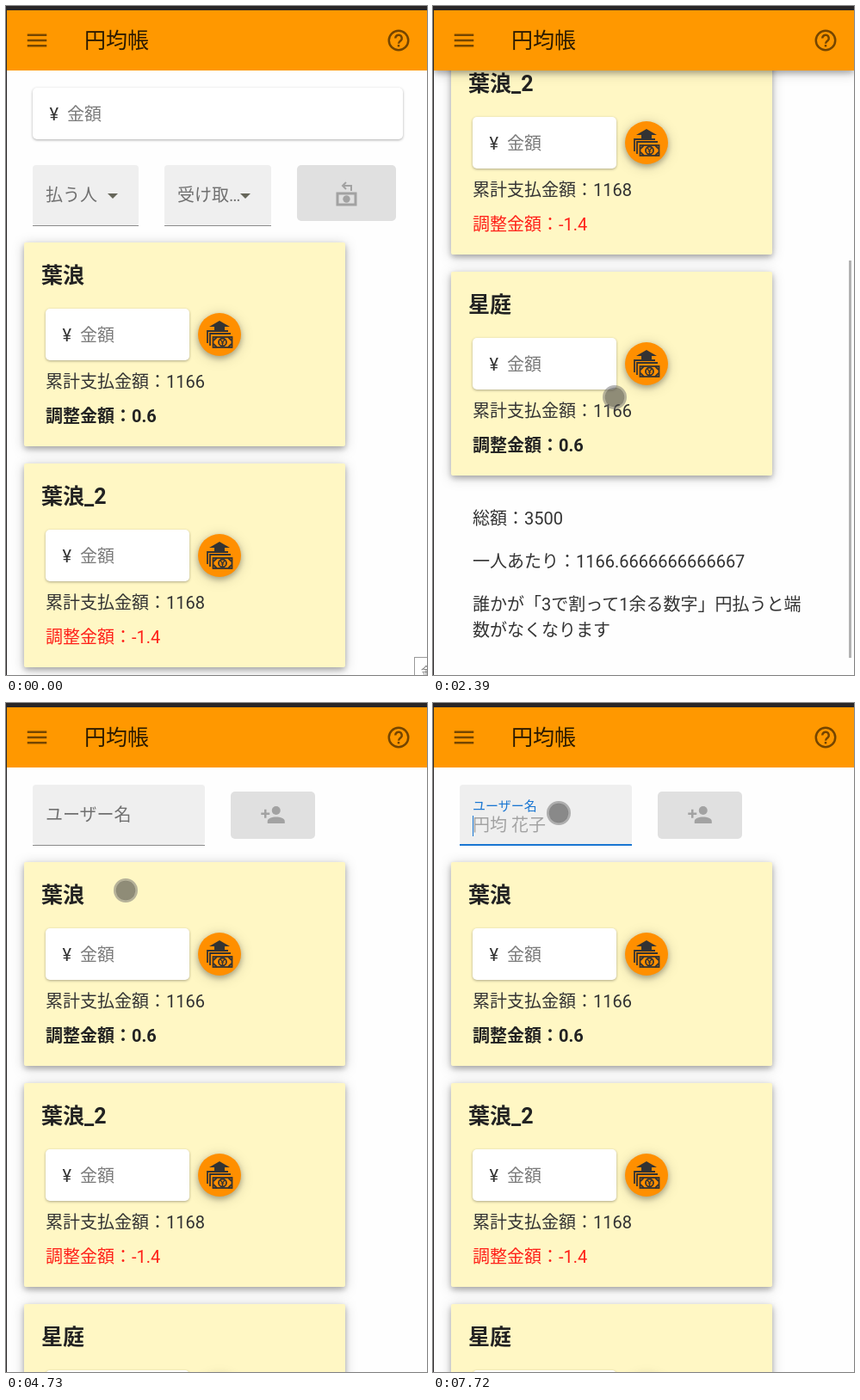
These frames come from a looping animation (489x778 px, 8 s). An HTML page:

```html
<!DOCTYPE html>
<html lang="ja">
<head>
<meta charset="utf-8">
<style>
html, body { margin: 0; width: 100%; height: 100%; overflow: hidden; background: #fefefe; }
svg { display: block; width: 489px; height: 778px; }
text { font: 20px Roboto, "Noto Sans CJK JP", "Noto Sans CJK", sans-serif; fill: #333; white-space: pre; }
.name { font-size: 25px; font-weight: 700; fill: #222; }
.bold { font-weight: 700; fill: #222; }
.title { font-size: 25px; fill: #2b1a00; }
.red { fill: #ff2018; }
.hint { fill: #7a7a7a; }
.label { fill: #707070; }
.item { font-size: 16.25px; fill: #222; }
.low { filter: drop-shadow(0 1.5px 1.5px rgba(0,0,0,.32)); }
.mid { filter: drop-shadow(0 3px 3px rgba(0,0,0,.24)) drop-shadow(0 2px 7px rgba(0,0,0,.2)); }
.line { fill: none; stroke: #000; stroke-width: 2; }
.off { fill: #a2a2a2; }
</style>
</head>
<body>
<svg id="stage" viewBox="0 0 489 778"></svg>
<script>
const rect = (x, y, w, h, fill, more = '') =>
  `<rect x="${x}" y="${y}" width="${w}" height="${h}" fill="${fill}" ${more}/>`;
const text = (x, y, s, cls = '') => `<text x="${x}" y="${y}" class="${cls}">${s}</text>`;
const icon = (x, y, shapes) =>
  `<g transform="translate(${x} ${y}) scale(1.25)" opacity=".54">${shapes}</g>`;

const amountBox = (x, y, w) =>
  rect(x, y, w, 60, '#fff', 'rx="5" class="low"') +
  text(x + 19.5, y + 38, '¥') + text(x + 40, y + 38, '金額', 'hint');

const payButton = (x, y) => `<g transform="translate(${x} ${y})" fill="none" stroke="#333" stroke-width="1.8">
  <circle r="25" fill="#ff8f00" stroke="none" class="mid"/>
  <path fill="#333" stroke="none" d="M0-16L12-9H6V-4H-6V-9H-12Z"/>
  <path d="M-14 10V-4H10M-11 13V-1H13"/>
  ${rect(-7.5, 3, 22, 12, 'none')}
  <path d="M-7 7L-3 3M10 3L14 7M-7 11L-3 15M10 15L14 11"/>
  <circle cx="3.5" cy="9" r="4.5"/>
  <path stroke-width="1.2" d="M1 6L3.5 9L6 6M3.5 9V13M1.5 10H5.5"/></g>`;

const card = (y, name, paid, diff) =>
  rect(21, y, 373, 237, '#fff7c4', 'rx="2" class="mid"') +
  text(41, y + 46.5, name, 'name') +
  amountBox(46, y + 77, 167) + payButton(248, y + 107) +
  text(46, y + 169, '累計支払金額：' + paid) +
  text(46, y + 209, '調整金額：' + diff, diff < 0 ? 'red' : 'bold');

const list = y =>
  card(y, '葉浪', 1166, 0.6) + card(y + 257, '葉浪_2', 1168, -1.4) + card(y + 514, '星庭', 1166, 0.6) +
  ['総額：3500', '一人あたり：1166.6666666666667', '誰かが「3で割って1余る数字」円払うと端']
    .map((s, i) => text(46, y + 808 + 50 * i, s)).join('') +
  text(46, y + 938, '数がなくなります');

const field = (x, y, w) =>
  rect(x, y, w, 70, '#efefef', 'rx="4"') + rect(x, y + 70, w, 1, '#8a8a8a');

const select = (x, w, s, arrow) => field(x, 185, w) + text(x + 15, 227, s, 'label') +
  `<path fill="#66665a" d="M${arrow - 6} 218h12l-6 6z"/>`;

const transferPage = amountBox(31, 95, 430) +
  select(31, 123, '払う人', 124) + select(184, 124, '受け取…', 278) +
  rect(338, 185, 115, 65, '#e0e0e0', 'rx="5"') +
  `<g fill="none" stroke="#a2a2a2" stroke-width="2"><path d="M395 205l-4 4l4 4M391 209h10v6"/>
   ${rect(385, 218, 21, 13, 'none', 'stroke-width="3"')}</g>
   <circle cx="395.5" cy="224.5" r="4.2" class="off"/>` +
  list(275);

const addPage = field(31, 95, 200) +
  rect(31, 164, 200, 2, '#1976d2', 'id="line"') +
  text(46, 149, '円均 花子', 'hint" id="sample') +
  '<text id="label">ユーザー名</text>' +
  rect(46, 131, 1, 24, '#1976d2', 'id="caret"') +
  rect(261, 103, 98, 55, '#e0e0e0', 'rx="5"') +
  `<g transform="translate(295 115) scale(1.25)"><circle cx="15" cy="8" r="4" class="off"/>
   <path class="off" d="M7 20v-2c0-5.3 16-5.3 16 0v2z"/>
   <path class="line" style="stroke:#a2a2a2" d="M1 11h8M5 7v8"/></g>` +
  list(185);

stage.innerHTML = rect(0, 0, 489, 778, '#fefefe') +
  `<g id="transfer">${transferPage}</g><g id="add">${addPage}</g>` +
  rect(1, 5, 488, 70, '#ff9800', 'id="bar"') +
  icon(21, 25, '<path class="line" d="M3 7h18M3 12h18M3 17h18"/>') +
  text(91, 48.5, '円均帳', 'title') +
  icon(441, 25, '<circle cx="12" cy="12" r="9" class="line"/>' +
    '<path class="line" d="M9 10a3 3 0 1 1 5.2 2q-2.2 1.6-2.2 3M12 16v2"/>') +
  rect(483, 0, 3, 0, '#000', 'id="thumb" fill-opacity=".3"') +
  rect(0, 0, 489, 778, '#000', 'id="shade"') +
  '<g id="drawer">' + rect(1, 5, 320, 773, '#fff', 'class="mid"') +
  rect(11, 70, 300, 50, '#e5e5e5', 'rx="5" id="active"') +
  ['ユーザー追加', '受け渡し', '投げ銭'].map((s, i) => text(21, 45 + 55 * i, s, 'item')).join('') + '</g>' +
  '<g id="tip">' + rect(474.5, 757.5, 20, 30, '#fff', 'stroke="#999"') +
  '<text x="482" y="778" style="font-size:12px;fill:#777">金額</text></g>' +
  `<g id="touch"><circle r="12.5" fill="none" stroke="#6e6e6e" stroke-opacity=".5" stroke-width="3"/>
   <circle r="11.2" fill="#444" fill-opacity=".6"/></g>` +
  rect(0, 0, 489, 5, '#292627') + rect(0, 0, 1, 778, '#292627');

const set = (id, attrs) => {
  for (const k in attrs) document.getElementById(id).setAttribute(k, attrs[k]);
};
const smooth = u => u * u * (3 - 2 * u);
const flick = u => 1 - (1 - u) ** 4;
const part = (t, start, end) => Math.min(1, Math.max(0, (t - start) / (end - start)));

// Follows moves of the form [start, end, ...target], resting in between.
const follow = (t, from, moves, ease) => moves.reduce((pos, [start, end, ...to]) =>
  pos.map((v, i) => v + (to[i] - v) * ease(part(t, start, end))), from);

const touchMoves = [
  [70, 870, 319, 451], [1600, 2390, 211, 455], [2460, 2700, 205, 550],
  [3070, 3420, 36, 40], [3480, 3850, 73, 138], [3980, 4180, 98, 41],
  [4380, 4730, 139, 218], [4800, 5120, 165, 120], [5190, 5720, 152, 145],
  [5920, 6080, 155, 184], [6250, 6600, 146, 128]
];
const scrollMoves = [
  [560, 1060, 421], [1130, 1200, 500], [2250, 2390, 480], [2460, 2920, 0],
  [4860, 5120, 410], [5500, 5720, 392], [5920, 6210, 0]
];

function draw(t) {
  const adding = t >= 4330;
  const [scroll] = follow(t, [0], scrollMoves, flick);
  const [x, y] = follow(t, [505, 720], touchMoves, smooth);
  const transform = `translate(0 ${-scroll})`;
  set('transfer', { display: adding ? 'none' : 'inline', transform });
  set('add', { display: adding ? 'inline' : 'none', transform });
  set('bar', { class: scroll > .5 ? 'mid' : '' });

  const ratio = 773 / (adding ? 1202 : 1293);
  set('thumb', { y: 9 + scroll * ratio, height: 773 * ratio, opacity: Math.min(1, scroll / 2) });

  const open = smooth(part(t, 3440, 3680) - part(t, 4330, 4570));
  set('drawer', { transform: `translate(${-330 * (1 - open)} 0)`, display: open ? 'inline' : 'none' });
  set('shade', { opacity: .4 * open });
  set('active', { y: adding ? 15 : 70 });

  const focus = smooth(part(t, 6790, 7050));
  set('label', {
    transform: `translate(46 ${137 - 12.5 * focus}) scale(${1 - .25 * focus})`,
    style: `fill:${focus ? '#1976d2' : '#707070'}`
  });
  set('line', { x: 131 - 100 * focus, width: 200 * focus });
  set('sample', { opacity: .65 * focus });
  set('caret', { opacity: t >= 6790 && (t - 6790) % 930 < 460 ? 1 : 0 });

  set('tip', { display: t < 70 ? 'inline' : 'none' });
  set('touch', { transform: `translate(${x} ${y})` });
}

const start = performance.now();
function tick() {
  draw((performance.now() - start) % 8000);
  requestAnimationFrame(tick);
}
tick();
</script>
</body>
</html>
```
